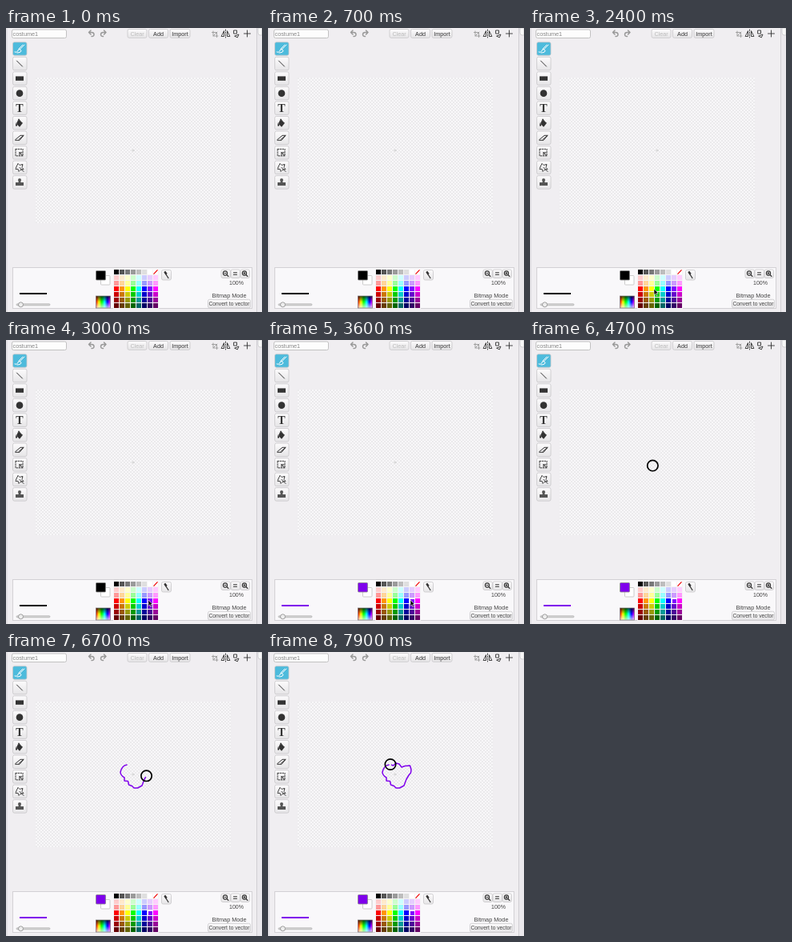
Recreate the animation shown at these times as an HTML page. Size 320x355 px, loop 8000 ms.

```html
<!DOCTYPE html>
<html lang="en">
<head>
<meta charset="utf-8">
<title>Paint editor</title>
<style>
html, body { margin: 0; width: 100%; height: 100%; overflow: hidden; background: #f0eef1; }
svg { display: block; width: 320px; height: 355px; }
text { font: 7.3px "Liberation Sans", Arial, sans-serif; fill: #444; }
.line { fill: none; stroke: #333; stroke-linecap: round; stroke-linejoin: round; }
.pale { stroke: #999; }
.active { stroke: #fff; }
.letter { font: bold 14px "Liberation Serif", Times, serif; fill: #333; }
</style>
</head>
<body>
<svg viewBox="0 0 320 355">
  <defs>
    <pattern id="checker" width="4" height="4" patternUnits="userSpaceOnUse" x="37" y="62">
      <rect width="4" height="4" fill="#f8f7f9"/>
      <path d="M0 0h2v2h-2zM2 2h2v2h-2z" fill="#ebeaec"/>
    </pattern>
    <linearGradient id="face" x2="0" y2="1">
      <stop stop-color="#fcfbfc"/><stop offset="1" stop-color="#e6e5e7"/>
    </linearGradient>
    <linearGradient id="hue"></linearGradient>
    <linearGradient id="shade" x2="0" y2="1">
      <stop stop-opacity=".75"/><stop offset=".5" stop-opacity="0"/>
      <stop offset=".5" stop-color="#fff" stop-opacity="0"/><stop offset="1" stop-color="#fff" stop-opacity=".75"/>
    </linearGradient>
  </defs>

  <rect width="320" height="355" fill="#f0eef1"/>
  <path d="M1 0v355" stroke="#dfdde1" stroke-width="1.5"/>
  <rect x="313" width="7" height="355" fill="#eae8ec"/>
  <path d="M313.5 0v355" stroke="#d0ced3"/>
  <path d="M320 9h-2q-3 0-3-3V0h5z" fill="#f8f8f8" stroke="#c8c8cc" stroke-width=".8"/>
  <rect x="37" y="62" width="244" height="182" fill="url(#checker)"/>
  <path d="M157 153h4M159 151.5v3" stroke="#ccc" stroke-width=".8"/>
  <rect x="8.5" y="299.5" width="299" height="51" fill="#f9f8fa" stroke="#d3d1d5"/>

  <rect x="7.5" y="2" width="68" height="10.5" rx="2" fill="#fdfdfd" stroke="#bbb" stroke-width=".9"/>
  <text x="8.5" y="9.8" style="fill:#888">costume1</text>
  <g class="line pale" stroke-width="1.5">
    <path id="undo" d="M103.5 5.5h3.5q3 0 3 2.6t-3 2.4M106 3l-2.5 2.5 2.5 2.5"/>
    <use href="#undo" transform="matrix(-1 0 0 1 228.5 0)"/>
  </g>
  <g id="buttons"></g>
  <g id="tools"></g>

  <g class="line" stroke-width=".9">
    <path class="pale" d="M259 4v6h6M257.5 5.5h6v6M259 10l5-5"/>
    <path d="M274.5 2v10" stroke-dasharray="1.5 1.5"/>
    <path d="M272.5 4v6.5h-3zM276.5 4v6.5h3z"/>
    <path d="M285 3h3.5v4h-3.5zM286 10l5-2-1.5 3.5z"/>
    <path d="M297.5 7h8M301.5 3v8"/>
  </g>

  <path id="sample" d="M17 332h34" stroke-width="1.8"/>
  <rect x="13" y="344.7" width="42" height="2.2" rx="1.1" fill="#d4d4d4" stroke="#aaa" stroke-width=".6"/>
  <circle cx="18.5" cy="345.8" r="3" fill="#eee" stroke="#888" stroke-width=".8"/>
  <rect x="118.5" y="309.5" width="11.5" height="11.5" rx="1" fill="#fff" stroke="#ccc"/>
  <rect id="ink" x="112.5" y="303.5" width="12" height="11.5" rx="1" stroke="#888" stroke-width=".8"/>
  <rect x="112.5" y="335" width="18" height="15" fill="url(#hue)"/>
  <rect x="112.5" y="335" width="18" height="15" fill="url(#shade)" stroke="#777" stroke-width=".7"/>
  <g id="palette"></g>
  <rect id="picked" x="177.5" y="323.5" width="6" height="6" fill="none" stroke="#fff"/>
  <path class="line" d="M198.5 305.5l1.2 2 3.2 5" stroke-width="1.3"/>
  <path d="M197.3 305l2-1.2 2.4 3.2-2.3 1.6z" fill="#333"/>

  <g class="line" stroke-width="1.1">
    <path d="M284.5 305.7h4M284.5 308.3h4"/>
    <g id="zoom"><circle cx="274" cy="306.5" r="2.6"/><path d="M276 308.5l2 2M273 306.5h2"/></g>
    <use href="#zoom" x="24"/><path d="M298 305.5v2"/>
  </g>
  <text x="288" y="321" text-anchor="middle" style="font-size:7px">100%</text>
  <text x="279" y="336.5" text-anchor="middle">Bitmap Mode</text>

  <path id="stroke" class="line" style="stroke:#7f00ec" stroke-width="1.5"
    d="M151 141q-6 1-8 9q0 4 5 7v4l4.5 .5 1 4.5 4 1.5 2.5 2.5h4.5l5.5-3 3-8 3-5 2.5-3 .5-4-1.5-5-6.5 .5-4 1.5-3-4-4-1-3.5 3-3.5-1.5"/>
  <circle id="brush" r="6.7" fill="none" stroke="#000" stroke-width="1.7"/>
  <path id="arrow" d="M0 0v7.5l1.7-1.5 1.3 2.8 1.3-.6-1.3-2.7h2.4z" stroke="#fff" stroke-width=".6"/>
</svg>
<script>
const $ = id => document.getElementById(id);
const LOOP = 8000, STEP = 100, PICK = 3200;
const ENTER = 1000, DRAW_START = 5230, DRAW_END = 7900, LAG = 60;

const box = (x, y, w, h, fill = 'url(#face)') =>
  `<rect x="${x}" y="${y}" width="${w}" height="${h}" rx="2" fill="${fill}" stroke="#c8c7ca" stroke-width=".8"/>`;
const button = (x, y, w, text, color = '#333', size = 7.2) => box(x, y, w, 10.8) +
  `<text x="${x + w / 2}" y="${y + 8}" text-anchor="middle" style="fill:${color};font-size:${size}px">${text}</text>`;

$('buttons').innerHTML =
  button(152, 1.5, 24, 'Clear', '#bbb') + button(178.5, 1.5, 24, 'Add') + button(205, 1.5, 25, 'Import') +
  button(252.5, 339.3, 53, 'Convert to vector', '#444', 6.7) + box(194.5, 302.5, 12, 12.5) +
  [0, 1, 2].map(i => box(269 + i * 12, 302, 11.5, 10.5)).join('');

// Tool icons, each drawn around its button's centre.
const solid = d => `<path d="${d}" fill="#333"/>`;
const lines = (d, extra = '') => `<path class="line" d="${d}" stroke-width="1" ${extra}/>`;
const icons = [
  `<path class="line active" d="M6-5L0 1M4-5L-1 0M-6 4q3 1 4-2t3-1 0 3-4 1"/>`,
  lines('M-3.5-3.5L3.5 3.5'),
  solid('M-5-2.7H5V2.7H-5z'),
  '<circle r="4.3" fill="#333"/>',
  '<text class="letter" y="4.7" text-anchor="middle">T</text>',
  solid('M-1-4L4 0 0 5-4 1zM-4-1q-2 5 0 5t0-5') + lines('M-3 0L-1-5 1-2'),
  lines('M-5 2L1-3H5L0 3H-5zM-1 2L5-3'),
  lines('M-5-4.5H4V4H-5z', 'stroke-dasharray="1.5 1.5"') + lines('M0 0L4 4M0 0v3M0 0h3'),
  lines('M-4-1l2-4 2 2 4-1-1 4 2 2-4 1-2 2-1-3-3 0z', 'stroke-dasharray="2 1"') + lines('M0 0l5 5'),
  '<circle cy="-3" r="2" fill="#555"/><path d="M-1-3H1L1.5 0H5V4H-5V0h3.5z" fill="#555"/>'
];
$('tools').innerHTML = icons.map((icon, i) => {
  const y = 26 + i * 18.55;
  return box(8.5, y - 8.3, 17.5, 16.5, i ? 'url(#face)' : '#4dbbdc') +
    `<g transform="translate(17 ${y})">${icon}</g>`;
}).join('');

// Colour picker and palette: one grey row, two pastel rows, then full hues getting darker.
function hsv(h, s, v) {
  const channel = n => {
    const k = (n + h / 60) % 6;
    return Math.round(255 * v * (1 - s * Math.max(0, Math.min(k, 4 - k, 1))));
  };
  return `rgb(${channel(5)},${channel(3)},${channel(1)})`;
}
$('hue').innerHTML = [0, 1, 2, 3, 4, 5].map(i =>
  `<stop offset="${i / 5}" stop-color="${hsv(i * 60, 1, 1)}"/>`).join('');

const hues = [0, 35, 60, 120, 180, 240, 270, 300];
function swatch(row, col) {
  if (row === 0) return hsv(0, 0, col ? Math.min(1, .2 + col * .135) : 0);
  if (row < 3) return hsv(hues[col], row * .2, 1);
  return hsv(hues[col], 1, 1 - (row - 3) * .2);
}
let cells = '<rect x="134" y="302" width="57" height="49" fill="#f4f3f5"/>';
for (let row = 0; row < 7; row++) {
  for (let col = 0; col < 8; col++) {
    cells += `<rect x="${135 + col * 7}" y="${302 + row * 7}" width="6" height="6" fill="${swatch(row, col)}"/>`;
  }
}
$('palette').innerHTML = cells + '<path d="M184.5 307.7l5-5.4" stroke="#e00" stroke-width="1.2"/>';

const trail = $('stroke');
const trailLength = trail.getTotalLength();
const first = trail.getPointAtLength(0);
const moves = [
  { from: ENTER, to: 1400, x: 14, y: 25 },
  { from: 1700, to: 2250, x: 155, y: 326 },
  { from: 2600, to: 3000, x: 178, y: 325 },
  { from: 3800, to: 4900, x: first.x, y: first.y }
];

const clamp = v => Math.max(0, Math.min(1, v));
const ease = k => k * k * (3 - 2 * k);

// The hand slows a little towards the end of the outline.
function drawn(t) {
  const u = clamp((t - DRAW_START) / (DRAW_END - DRAW_START));
  return trailLength * (u + .25 * u * (1 - u));
}

function pointer(t) {
  if (t >= DRAW_START) return trail.getPointAtLength(drawn(t));
  let x = 3, y = 20;
  for (const move of moves) {
    const k = ease(clamp((t - move.from) / (move.to - move.from)));
    x += (move.x - x) * k;
    y += (move.y - y) * k;
  }
  return { x, y };
}

const show = (id, visible) => { $(id).style.display = visible ? '' : 'none'; };

function render(t) {
  const { x, y } = pointer(t);
  const onCanvas = x > 37 && x < 281 && y > 62 && y < 244;
  const picked = t >= PICK;
  for (const id of ['arrow', 'brush']) $(id).setAttribute('transform', `translate(${x} ${y})`);
  show('arrow', t >= ENTER && !onCanvas);
  show('brush', t >= ENTER && onCanvas);
  show('picked', picked);

  const color = picked ? '#7f00ec' : '#000';
  $('ink').setAttribute('fill', color);
  $('sample').setAttribute('stroke', color);

  const length = drawn(t - LAG);
  show('stroke', length > 0);
  trail.setAttribute('stroke-dasharray', `${length} ${trailLength + 9}`);
}

const start = performance.now();
function tick(now) {
  const t = Math.max(0, now - start) % LOOP;
  render(Math.floor(t / STEP) * STEP);
  requestAnimationFrame(tick);
}
render(0);
requestAnimationFrame(tick);
</script>
</body>
</html>
```
